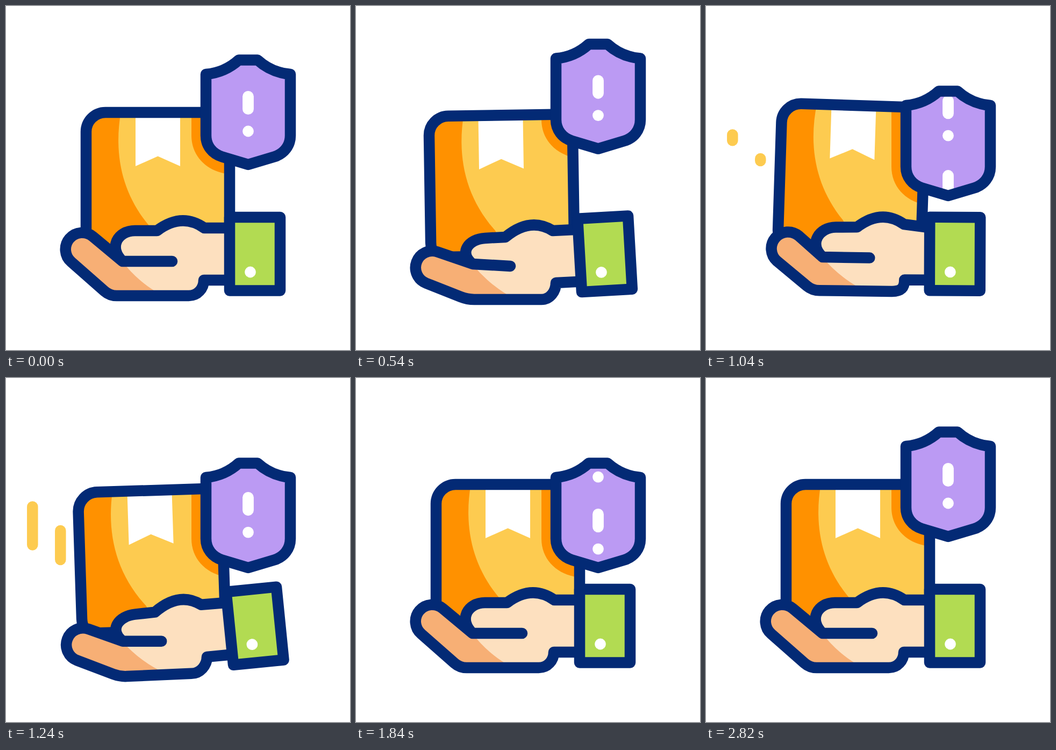
Animation, 640 px wide and 640 px high, one loop 2.88 s. Source, as an HTML page:

```html
<!DOCTYPE html>
<html lang="en">
<head>
<meta charset="utf-8">
<title>Parcel care</title>
<style>
  html, body { margin: 0; width: 100%; height: 100%; overflow: hidden; background: #fff; }
  svg { display: block; width: 100vw; height: 100vh; }
  .ink { fill: none; stroke: #032a75; stroke-width: 20.5; stroke-linejoin: round; stroke-linecap: round; }
  .dash { stroke: #fdcb50; stroke-width: 20.5; stroke-linecap: round; }
</style>
</head>
<body>
<svg viewBox="0 0 640 640">
  <defs>
    <path id="boxShape" d="M185 198H416V460H176Q149 460 149 433V234A36 36 0 0 1 185 198Z"/>
    <path id="shieldShape" d="M433 100.5H468Q494 124 529 127V241C529 260 517 275 499 280.5L450.5 295L402 280.5C384 275 372 260 372 241V127Q407 124 433 100.5Z"/>
    <clipPath id="boxClip"><use id="boxMask" href="#boxShape"/></clipPath>
    <clipPath id="shieldClip"><use href="#shieldShape"/></clipPath>
    <g id="mark">
      <path d="M450.5 168.3V191.7" stroke="#fff" stroke-width="20.8" stroke-linecap="round"/>
      <circle cx="450.5" cy="233" r="10.4" fill="#fff"/>
    </g>
  </defs>

  <line id="dashA" class="dash" x1="49.3" x2="49.3"/>
  <line id="dashB" class="dash" x1="101.3" x2="101.3"/>
  <line id="dashC" class="dash" x1="449.3" x2="449.3"/>

  <g clip-path="url(#boxClip)">
    <g id="boxFill">
      <use href="#boxShape" fill="#ff9100"/>
      <path d="M215 190C200 268 212 346 269 412L300 470H430V190Z" fill="#fdcb50"/>
      <path d="M241 198H324V298L282.5 279.5L241 298Z" fill="#fff"/>
    </g>
    <path id="shade" d="M345 60V241C345 277 370 304 406 311.5L450 325V60Z" fill="#ff9100"/>
  </g>
  <use id="boxLine" href="#boxShape" class="ink"/>

  <path id="palm" fill="#fde0bf"/>
  <path id="finger" fill="#f7af75"/>
  <path id="handLine" class="ink"/>

  <g id="cuff">
    <rect x="416" y="393" width="94" height="136.5" fill="#b2db52"/>
    <rect x="416" y="393" width="94" height="136.5" class="ink"/>
    <circle cx="454.5" cy="495" r="10.4" fill="#fff"/>
  </g>

  <g id="shield">
    <use href="#shieldShape" fill="#bb9af3"/>
    <g clip-path="url(#shieldClip)">
      <use id="markOut" href="#mark"/>
      <use id="markIn" href="#mark"/>
    </g>
    <use href="#shieldShape" class="ink"/>
  </g>
</svg>
<script>
const LOOP = 2880, TIP = 31, HUB = [463, 461];
const $ = id => document.getElementById(id);
const set = (id, name, value) => $(id).setAttribute(name, value);
const mix = (a, b, k) => a.map((v, i) => v + (b[i] - v) * k);
const phase = (t, a, b) => Math.min(1, Math.max(0, (t - a) / (b - a)));
const sine = (t, a, b) => (1 - Math.cos(Math.PI * phase(t, a, b))) / 2;
const add = (p, x, y) => [p[0] + x, p[1] + y];
const pt = p => p[0].toFixed(2) + ' ' + p[1].toFixed(2);

// cuff angle, box x/y/angle, then hand points: bulge right, bulge left,
// thumb top, crease, crease end, fingertip, heel, palm corner, wrist
const REST = [0, 0, 0, 0,
  369, 413, 281, 418, 240, 418, 217, 475, 309, 475, 142, 453, 193, 539, 340, 539, 368, 510];
const LOW = [-3.3, -12.3, 5.3, -0.9,
  366, 418, 278, 430, 240, 432, 217, 480, 287, 484, 142, 487, 207, 546, 345, 546, 372, 515];
const HIGH = [1.8, -9.3, -19.5, 2.8,
  370, 402, 282, 405, 242, 404, 217, 461, 308, 463, 154, 439, 194, 522, 346, 526, 368, 507];
const DEEP = [-5.8, -13, 11.5, -1.9,
  363, 422, 277, 436, 240, 440, 217, 490, 289, 490, 143, 497, 212, 556, 345, 550, 374, 519];

const KEYS = [
  [140, REST], [380, mix(REST, DEEP, 1.12)], [540, LOW], [860, HIGH],
  [940, mix(LOW, HIGH, 1.05)], [1260, DEEP], [1800, REST], [LOOP, REST]
];

// Monotone cubic through the keyed poses
function poseAt(t) {
  if (t <= KEYS[0][0]) return REST;
  let k = 0;
  while (k < KEYS.length - 2 && t > KEYS[k + 1][0]) k++;
  const rate = (j, i) => j < 0 || j > KEYS.length - 2 ? 0
    : (KEYS[j + 1][1][i] - KEYS[j][1][i]) / (KEYS[j + 1][0] - KEYS[j][0]);
  const slope = (j, i) => {
    const a = rate(j - 1, i), b = rate(j, i);
    return a * b > 0 ? 2 * a * b / (a + b) : 0;
  };
  const [t0, from] = KEYS[k], [t1, to] = KEYS[k + 1];
  const h = t1 - t0, s = (t - t0) / h, r = 1 - s;
  return from.map((v, i) =>
    v * (1 + 2 * s) * r * r + to[i] * s * s * (3 - 2 * s) +
    h * s * r * (slope(k, i) * r - slope(k + 1, i) * s));
}

function spin(p, deg) {
  const a = deg * Math.PI / 180, x = p[0] - HUB[0], y = p[1] - HUB[1];
  return [HUB[0] + x * Math.cos(a) - y * Math.sin(a), HUB[1] + x * Math.sin(a) + y * Math.cos(a)];
}

// Where a line from p touches the fingertip circle
function touch(c, p, side) {
  const x = p[0] - c[0], y = p[1] - c[1];
  const a = Math.atan2(y, x) + side * Math.acos(TIP / Math.hypot(x, y));
  return add(c, TIP * Math.cos(a), TIP * Math.sin(a));
}

function toward(p, q, d) {
  return mix(p, q, d / Math.hypot(q[0] - p[0], q[1] - p[1]));
}

function drawHand(v) {
  const pts = [];
  for (let i = 4; i < v.length; i += 2) pts.push([v[i], v[i + 1]]);
  const [bulgeR, bulgeL, thumb, crease, creaseEnd, tip, heel, corner, wrist] = pts;
  const top = touch(tip, crease, -1), low = touch(tip, heel, 1);
  const crown = add(mix(bulgeL, bulgeR, 0.5), 2, -32);
  const c1 = add(thumb, (thumb[0] - bulgeL[0]) * 0.8, (thumb[1] - bulgeL[1]) * 0.8);
  const c2 = add(crease, -27, (thumb[1] - crease[1]) * 0.44);

  const nail = `L${pt(top)}A${TIP} ${TIP} 0 0 0 ${pt(low)}` +
    `L${pt(toward(heel, low, 13))}Q${pt(heel)} ${pt(toward(heel, corner, 13))}`;
  const outline = `M${pt(spin([420, 413], v[0]))}L${pt(bulgeR)}Q${pt(crown)} ${pt(bulgeL)}` +
    `L${pt(thumb)}C${pt(c1)} ${pt(c2)} ${pt(crease)}${nail}L${pt(corner)}` +
    `C${pt(add(corner, 16, 0))} ${pt(add(wrist, 0, 16))} ${pt(wrist)}L${pt(spin([420, 510], v[0]))}`;
  const edge = add(corner, -48, 0), start = add(crease, 0, 1);
  const bend = add(mix(start, edge, 0.5), -7, 8);

  set('palm', 'd', outline + 'Z');
  set('finger', 'd', `M${pt(crease)}${nail}L${pt(edge)}Q${pt(bend)} ${pt(start)}Z`);
  set('handLine', 'd', `${outline}M${pt(crease)}L${pt(creaseEnd)}`);
}

// A dash that grows from y0 to y1, then shrinks toward y1
function drawDash(id, y0, y1, t, on, full, fade, off) {
  const head = sine(t, on, full), tail = sine(t, fade, off);
  set(id, 'y1', y0 + (y1 - y0) * tail);
  set(id, 'y2', y0 + (y1 - y0) * head);
  set(id, 'visibility', head - tail > 0.01 ? 'visible' : 'hidden');
}

function draw(t) {
  const v = poseAt(t);
  const boxMove = `translate(${v[1]} ${v[2]}) rotate(${v[3]} 282.5 279.5)`;
  for (const id of ['boxMask', 'boxFill', 'boxLine']) set(id, 'transform', boxMove);
  drawHand(v);
  set('cuff', 'transform', `rotate(${v[0]} ${HUB})`);

  const lift = -50 * sine(t, 140, 380) + 108 * sine(t, 380, 940) - 58 * sine(t, 2233, 2567);
  set('shield', 'transform', `translate(0 ${lift})`);
  set('shade', 'transform', `translate(0 ${lift})`);

  const first = t < 1480, gap = first ? 139 : 134;
  const slide = gap * (first ? sine(t, 647, 1313) : sine(t, 1643, 2310));
  set('markOut', 'transform', `translate(0 ${slide})`);
  set('markIn', 'transform', `translate(0 ${slide - gap})`);

  drawDash('dashA', 239.5, 310.5, t, 980, 1220, 1250, 1480);
  drawDash('dashB', 284, 338, t, 1000, 1230, 1260, 1490);
  drawDash('dashC', 74, 36.5, t, 2353, 2535, 2535, 2730);
}

const begin = performance.now();
function tick() {
  draw((performance.now() - begin) % LOOP);
  requestAnimationFrame(tick);
}
tick();
</script>
</body>
</html>
```
